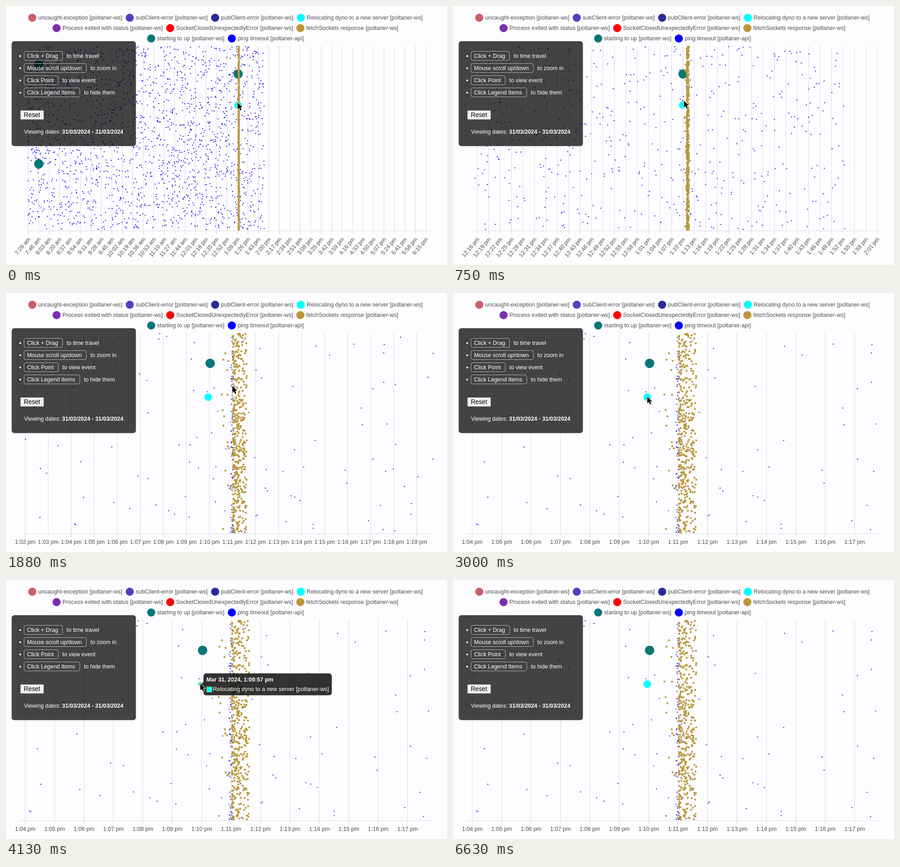
These frames come from a looping animation (976 px wide and 574 px high, 6760 ms). An HTML page with a canvas:

```html
<!DOCTYPE html>
<html lang="en">
<head>
<meta charset="utf-8">
<style>
  html, body { margin: 0; width: 100%; height: 100%; overflow: hidden; background: #fdfcff; }
  canvas { display: block; }
</style>
</head>
<body>
<canvas width="976" height="574"></canvas>
<script>
const ctx = document.querySelector('canvas').getContext('2d');
const FONT = '"Liberation Sans", Arial, sans-serif';
const TOP = 88, RIGHT = 947, LOOP = 6760;
const GOLD = '#bb9739', TEAL = '#067777', CYAN = '#00ffff', BLUE = '#0000d8', PURPLE = '#7c2db2';
const GRID = '#dad9dd', LABEL = '#4e4e50';
const BURST = 342; // minutes from 7:29 am to 1:11 pm

// Step, then: log of pixels per minute, x of 1:11 pm, left edge of the plot
const VIEW = [
  [0, Math.log(1.3622), 514.9, 49],
  [3, Math.log(5.98), 525.4, 52],
  [10, Math.log(13.326), 506.6, 41],
  [15, Math.log(50.97), 501.2, 36],
  [18, Math.log(65.1), 498.2, 31]
];
const POINTER = [[0, 512.5, 214], [3, 512, 213], [10, 509.5, 205], [15, 501, 206], [19, 497, 207], [23, 430, 229.5]];
const TOOLTIP = [[24, 0], [27, 1], [49, 1], [52, 0]];

const RELOCATING = 'Relocating dyno to a new server [poltaner-ws]';
const LEGEND = [
  [
    ['#ca5d69', 'uncaught-exception [poltaner-ws]'],
    ['#573cc0', 'subClient-error [poltaner-ws]'],
    ['#2a2a99', 'pubClient-error [poltaner-ws]'],
    [CYAN, RELOCATING]
  ], [
    [PURPLE, 'Process exited with status [poltaner-ws]'],
    ['#ff0000', 'SocketClosedUnexpectedlyError [poltaner-ws]'],
    [GOLD, 'fetchSockets response [poltaner-ws]']
  ], [
    [TEAL, 'starting to up [poltaner-ws]'],
    ['#0000ff', 'ping timeout [poltaner-api]']
  ]
];
const HINTS = [
  ['Click + Drag', 'to time travel'],
  ['Mouse scroll up/down', 'to zoom in'],
  ['Click Point', 'to view event'],
  ['Click Legend Items', 'to hide them']
];

let seed = 7;
const random = () => (seed = (seed * 16807) % 2147483647) / 2147483647;

// Events are pairs: minutes since 7:29 am and height from 0 to 1
const scatter = (count, time) => Array.from({ length: count }, () => [time(), 0.005 + random() * 0.99]);
const pings = [
  ...scatter(1930, () => random() * 383.5),
  ...scatter(75, () => BURST - 0.08 + (random() + random() * random()) * 0.09)
];
const responses = [
  ...scatter(430, () => BURST + 0.03 + 0.59 * random() ** 1.7),
  ...scatter(16, () => BURST - 0.52 + 0.4 * random())
];
const startups = [[17.3, 0.102], [17.3, 0.639], [341.03, 0.1525]];
const exits = [[17.3, 0.925]];
const relocations = [[340.95, 0.321]];

function track(keys, k) {
  const i = keys.findIndex(key => key[0] > k);
  if (i === 0) return keys[0].slice(1);
  if (i < 0) return keys[keys.length - 1].slice(1);
  const a = keys[i - 1], b = keys[i], f = (k - a[0]) / (b[0] - a[0]);
  return a.slice(1).map((v, j) => v + (b[j + 1] - v) * f);
}

// Draws text centred vertically on y and returns its width
function text(str, x, y, color, size = 12.65, weight = '', align = 'left') {
  ctx.font = `${weight} ${size}px ${FONT}`;
  ctx.textAlign = align;
  ctx.fillStyle = color;
  ctx.fillText(str, x, y + size * 0.35);
  return ctx.measureText(str).width;
}

function dots(points, r, color) {
  ctx.fillStyle = color;
  ctx.beginPath();
  for (const [x, y] of points) {
    ctx.moveTo(x + r, y);
    ctx.arc(x, y, r, 0, 7);
  }
  ctx.fill();
}

function box(x, y, w, h, r, fill, stroke) {
  ctx.beginPath();
  ctx.roundRect(x, y, w, h, r);
  if (fill) { ctx.fillStyle = fill; ctx.fill(); }
  if (stroke) { ctx.strokeStyle = stroke; ctx.lineWidth = 1; ctx.stroke(); }
}

function clock(minutes) {
  const m = minutes + 449, h = Math.floor(m / 60);
  return `${h % 12 || 12}:${String(m % 60).padStart(2, '0')} ${h < 12 ? 'am' : 'pm'}`;
}

function drawAxis(left, bottom, center, scale, tilted) {
  const step = Math.ceil(22.95 / scale);
  const first = Math.ceil(BURST + (left - center) / scale - 0.02);
  ctx.fillStyle = GRID;
  ctx.fillRect(left, bottom, RIGHT - left, 1);
  for (let t = first, x; (x = center + (t - BURST) * scale) <= RIGHT; t += step) {
    ctx.fillStyle = GRID;
    ctx.fillRect(x - 0.5, TOP, 1, bottom - TOP + 8);
    ctx.save();
    if (tilted) {
      ctx.translate(x + 2, 514.5);
      ctx.rotate(-50 * Math.PI / 180);
      text(clock(t), 0, 0, LABEL, 12.65, '', 'right');
    } else {
      text(clock(t), x, 552, LABEL, 12.65, '', 'center');
    }
    ctx.restore();
  }
}

function drawChart(k, hover) {
  const [logScale, center, left] = track(VIEW, k);
  const scale = Math.exp(logScale);
  const tilted = scale < 48, bottom = tilted ? 498 : 533;
  const plot = (events, r, color) => dots(
    events.map(([t, v]) => [center + (t - BURST) * scale, TOP + v * (bottom - TOP)]), r, color);

  drawAxis(left, bottom, center, scale, tilted);
  ctx.save();
  ctx.beginPath();
  ctx.rect(left - 1, TOP, RIGHT - left + 1, bottom - TOP + 1);
  ctx.clip();
  plot(pings, 1.15, BLUE);
  plot(startups, 10.4, TEAL);
  plot(exits, 2, PURPLE);
  if (hover) plot(relocations, 4.5, GOLD);
  plot(relocations, 8.4 - 5 * hover, CYAN);
  plot(responses, 2.2, GOLD);
  ctx.restore();
}

function drawLegend() {
  const indent = 22, gap = 7.5;
  ctx.font = `12.65px ${FONT}`;
  LEGEND.forEach((row, i) => {
    const y = 26 + 23 * i;
    const widths = row.map(([, label]) => indent + ctx.measureText(label).width + gap);
    let x = 485.6 - (widths.reduce((a, b) => a + b) - gap) / 2;
    row.forEach(([color, label], j) => {
      dots([[x + 9, y]], 9, color);
      text(label, x + indent, y, LABEL);
      x += widths[j];
    });
  });
}

function drawPanel() {
  box(12.5, 78, 275, 232.5, 6, 'rgba(0,0,0,.735)');
  HINTS.forEach(([action, effect], i) => {
    const y = 110.5 + 27 * i;
    dots([[31.5, y + 0.5]], 2, '#fff');
    const width = text(action, 46.5, y, '#fff', 12.55) + 16.5;
    box(40, y - 10, width, 20, 3.5, null, '#b5b5b5');
    text(effect, 49 + width, y, '#fff', 12.55);
  });
  box(32, 231.5, 51.5, 20, 1.5, '#efefef', '#858585');
  text('Reset', 39.5, 241, '#000', 13.8);
  const width = text('Viewing dates: ', 40, 278.5, '#fff', 12.45);
  text('31/03/2024 - 31/03/2024', 40 + width, 278.5, '#fff', 12.45, 'bold');
}

function drawTooltip(alpha) {
  ctx.save();
  ctx.globalAlpha = alpha;
  box(437, 207, 284, 48.5, 6, 'rgba(0,0,0,.8)');
  ctx.fill(new Path2D('M437 226l-5 5 5 5z'));
  text('Mar 31, 2024, 1:09:57 pm', 443.5, 220.5, '#fff', 12.65, 'bold');
  box(444, 236.5, 12, 12, 0, CYAN, GOLD);
  text(RELOCATING, 458, 242, '#fff');
  ctx.restore();
}

const arrow = new Path2D('M0 0V15L3.5 11.8 6 17.5 8.6 16.4 6.2 10.8H10.8Z');
function drawPointer(x, y) {
  ctx.save();
  ctx.translate(x, y);
  ctx.lineJoin = 'round';
  ctx.lineWidth = 2;
  ctx.strokeStyle = '#fff';
  ctx.stroke(arrow);
  ctx.fillStyle = '#000';
  ctx.fill(arrow);
  ctx.restore();
}

function render(now) {
  // The picture advances eight times a second
  const k = Math.floor(Math.floor((now % LOOP) / 10) / 12.5);
  const [hover] = track(TOOLTIP, k);
  ctx.fillStyle = '#fdfcff';
  ctx.fillRect(0, 0, 976, 574);
  drawChart(k, hover);
  drawLegend();
  drawPanel();
  if (hover) drawTooltip(hover);
  if (k < 52) drawPointer(...track(POINTER, k));
}

const start = performance.now();
function loop() {
  render(performance.now() - start);
  requestAnimationFrame(loop);
}
loop();
</script>
</body>
</html>
```
